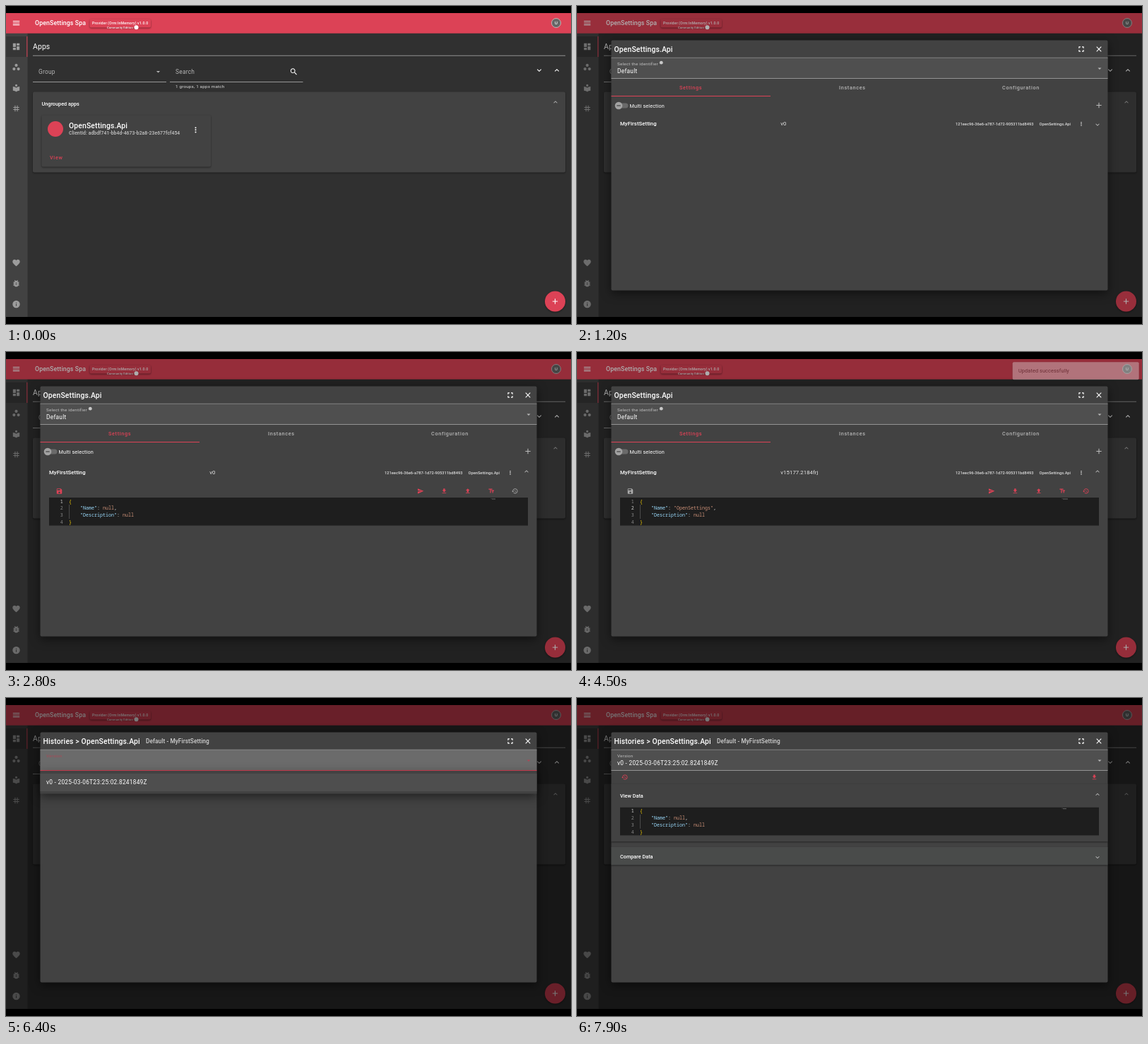
An HTML page that plays this animation: 800x450 px, repeating every 8000 ms.

```html
<!DOCTYPE html>
<html lang="en">
<head>
<meta charset="utf-8">
<title>Settings console</title>
<style>
  html, body { margin: 0; width: 100%; height: 100%; overflow: hidden; background: #000; }
  svg { display: block; width: 800px; height: 450px; font-family: Roboto, sans-serif; }
  text { white-space: pre; }
  .mono { font-family: "Noto Sans Mono", monospace; }
  .lift { filter: drop-shadow(0 1px 1.2px rgba(0, 0, 0, .45)); }
  .high { filter: drop-shadow(0 4px 7px rgba(0, 0, 0, .5)); }
</style>
</head>
<body>
<svg id="stage" viewBox="0 0 800 450"></svg>
<script>
const LOOP = 8000;
const RED = '#dc4256', GREY = '#9c9c9c', PANEL = '#424242';

const ICONS = {
  menu: 'M3 18h18v-2H3v2zm0-5h18v-2H3v2zm0-7v2h18V6H3z',
  dashboard: 'M3 13h8V3H3v10zm0 8h8v-6H3v6zm10 0h8V11h-8v10zm0-18v6h8V3h-8z',
  groups: 'M6 13a4 4 0 100 8 4 4 0 000-8zm6-10a4 4 0 100 8 4 4 0 000-8zm6 10a4 4 0 100 8 4 4 0 000-8z',
  library: 'M12 11.55C9.64 9.35 6.48 8 3 8v11c3.48 0 6.64 1.35 9 3.55 2.36-2.19 5.52-3.55 9-3.55V8c-3.48 0-6.64 1.35-9 3.55zM12 8a3 3 0 100-6 3 3 0 000 6z',
  tag: 'M20 10V8h-4V4h-2v4h-4V4H8v4H4v2h4v4H4v2h4v4h2v-4h4v4h2v-4h4v-2h-4v-4h4zm-6 4h-4v-4h4v4z',
  heart: 'M12 21.35l-1.45-1.32C5.4 15.36 2 12.28 2 8.5 2 5.42 4.42 3 7.5 3c1.74 0 3.41.81 4.5 2.09C13.09 3.81 14.76 3 16.5 3 19.58 3 22 5.42 22 8.5c0 3.78-3.4 6.86-8.55 11.54L12 21.35z',
  bug: 'M20 8h-2.81c-.45-.78-1.07-1.45-1.82-1.96L17 4.41 15.59 3l-2.17 2.17C12.96 5.06 12.49 5 12 5c-.49 0-.96.06-1.41.17L8.41 3 7 4.41l1.62 1.63C7.88 6.55 7.26 7.22 6.81 8H4v2h2.09c-.05.33-.09.66-.09 1v1H4v2h2v1c0 .34.04.67.09 1H4v2h2.81c1.04 1.79 2.97 3 5.19 3s4.15-1.21 5.19-3H20v-2h-2.09c.05-.33.09-.66.09-1v-1h2v-2h-2v-1c0-.34-.04-.67-.09-1H20V8zm-6 8h-4v-2h4v2zm0-4h-4v-2h4v2z',
  info: 'M12 2a10 10 0 100 20 10 10 0 000-20zm1 15h-2v-6h2v6zm0-8h-2V7h2v2z',
  search: 'M15.5 14h-.79l-.28-.27C15.41 12.59 16 11.11 16 9.5 16 5.91 13.09 3 9.5 3S3 5.91 3 9.5 5.91 16 9.5 16c1.61 0 3.09-.59 4.23-1.57l.27.28v.79l5 4.99L20.49 19l-4.99-5zm-6 0C7.01 14 5 11.99 5 9.5S7.01 5 9.5 5 14 7.01 14 9.5 11.99 14 9.5 14z',
  down: 'M16.59 8.59L12 13.17 7.41 8.59 6 10l6 6 6-6z',
  up: 'M12 8l-6 6 1.41 1.41L12 10.83l4.59 4.58L18 14z',
  caret: 'M7 10l5 5 5-5z',
  more: 'M12 8a2 2 0 100-4 2 2 0 000 4zm0 2a2 2 0 100 4 2 2 0 000-4zm0 6a2 2 0 100 4 2 2 0 000-4z',
  add: 'M19 13h-6v6h-2v-6H5v-2h6V5h2v6h6v2z',
  close: 'M19 6.41L17.59 5 12 10.59 6.41 5 5 6.41 10.59 12 5 17.59 6.41 19 12 13.41 17.59 19 19 17.59 13.41 12z',
  full: 'M7 14H5v5h5v-2H7v-3zm-2-4h2V7h3V5H5v5zm12 7h-3v2h5v-5h-2v3zM14 5v2h3v3h2V5h-5z',
  save: 'M17 3H5c-1.11 0-2 .9-2 2v14c0 1.1.89 2 2 2h14c1.1 0 2-.9 2-2V7l-4-4zm-5 16a3 3 0 110-6 3 3 0 010 6zm3-10H5V5h10v4z',
  send: 'M2.01 21L23 12 2.01 3 2 10l15 2-15 2z',
  download: 'M19 9h-4V3H9v6H5l7 7 7-7zM5 18v2h14v-2H5z',
  upload: 'M9 16h6v-6h4l-7-7-7 7h4zm-4 2h14v2H5z',
  letters: 'M2.5 4v3h5v12h3V7h5V4h-13zm19 5h-9v3h3v7h3v-7h3V9z',
  history: 'M13 3c-4.97 0-9 4.03-9 9H1l3.89 3.89.07.14L9 12H6c0-3.87 3.13-7 7-7s7 3.13 7 7-3.13 7-7 7c-1.93 0-3.68-.79-4.94-2.06l-1.42 1.42C8.27 19.99 10.51 21 13 21c4.97 0 9-4.03 9-9s-4.03-9-9-9zm-1 5v5l4.28 2.54.72-1.21-3.5-2.08V8H12z'
};

const clamp = v => Math.max(0, Math.min(1, v));
const ease = v => 1 - (1 - clamp(v)) ** 3;
const escape = s => s.replace(/&/g, '&amp;').replace(/</g, '&lt;');
const rect = (x, y, w, h, fill, extra = '') =>
  `<rect x="${x}" y="${y}" width="${w}" height="${h}" fill="${fill}" ${extra}/>`;
const circle = (x, y, r, fill, extra = '') =>
  `<circle cx="${x}" cy="${y}" r="${r}" fill="${fill}" ${extra}/>`;
const icon = (name, x, y, size = 12.5, fill = '#fff') =>
  `<path d="${ICONS[name]}" fill="${fill}" transform="translate(${x - size / 2} ${y - size / 2}) scale(${size / 24})"/>`;
// Text is placed by its left edge and the middle of its capitals.
const text = (x, y, size, str, { weight = 400, fill = '#fff', gap = 0, extra = '' } = {}) =>
  `<text x="${x}" y="${y + size * .355}" font-size="${size}" font-weight="${weight}" fill="${fill}" letter-spacing="${gap}" ${extra}>${escape(str)}</text>`;
const bold = (x, y, size, str, fill = '#fff', gap = 0) => text(x, y, size, str, { weight: 500, fill, gap });
const heading = (x, y, str) => bold(x, y, 10.42, str, '#fff', .13);
const field = (x, y, str, fill = '#fff') => text(x, y, 8.33, str, { fill, gap: .26 });
const small = (x, y, str, fill) => text(x, y, 6.25, str, { fill, gap: .2 });

function page(t) {
  const hover = clamp((t - 500) / 300);
  const side = [['dashboard', 57.5], ['groups', 86.5], ['library', 116], ['tag', 145],
    ['heart', 363.5], ['bug', 392.5], ['info', 422]];
  return rect(0, 10, 800, 430, '#303030') +
    rect(0, 38, 30.5, 402, PANEL) + rect(0, 43, 30, 29, '#363636') + rect(29.3, 43, 1, 29, RED) +
    side.map(([name, y]) => icon(name, 14.5, y, 12.5, GREY)).join('') +
    rect(0, 10, 800, 28.7, RED) + icon('menu', 14.5, 24) +
    bold(41, 24.3, 8.8, 'OpenSettings Spa', '#fff', .11) +
    rect(118.5, 18.5, 86.5, 12, RED, 'rx="2" class="lift"') +
    bold(122, 24.3, 5.2, 'Provider (Orm:InMemory) v1.0.0', '#fff', .15) +
    bold(143, 30.1, 4.17, 'Community Edition', '#fff', .09) + circle(184.5, 30.2, 3, '#fff') +
    circle(779, 24, 6.5, '#666', 'stroke="#ccc" stroke-width=".8"') + bold(777, 24.2, 6, 'U') +
    text(38, 57, 10.42, 'Apps', { gap: .13 }) + rect(38, 69.8, 754, .8, '#aaa') +
    field(46, 93.3, 'Group', '#b5b5b5') + icon('caret', 215.5, 93, 12.5, '#b5b5b5') + rect(38, 107, 189, .8, '#b0b0b0') +
    field(240, 93.3, 'Search', '#b5b5b5') + icon('search', 407.5, 93) + rect(232, 107, 188.5, .8, '#b0b0b0') +
    small(240, 114, '1 groups, 1 apps match', '#ddd') +
    icon('down', 755, 91) + icon('up', 780, 91) +
    rect(38, 121.5, 754, 114, PANEL, 'rx="2" class="lift"') +
    bold(50.5, 138.2, 7.29, 'Ungrouped apps') + icon('up', 778, 136, 11, '#b5b5b5') +
    rect(50.5, 154.5, 239.5, 73, PANEL, 'rx="2" class="lift"') +
    circle(70, 174, 11, RED) + heading(89, 169.5, 'OpenSettings.Api') +
    bold(89, 179.3, 6.77, 'ClientId: adbdf741-bb4d-4673-b2a8-23e677fcf454', '#c6c6c6', .09) +
    icon('more', 268.5, 175.3) +
    rect(54.5, 204.5, 33.5, 18.5, RED, `rx="2" opacity="${.25 * hover}"`) +
    bold(62, 214, 7.29, 'View', RED, .65) +
    circle(777.5, 418, 14.5, RED, 'class="lift"') + icon('add', 777.5, 418);
}

const backdrop = opacity => rect(0, 10, 800, 430, '#000', `opacity="${opacity}"`);

const dialogFrame = title =>
  rect(48.5, 48.5, 703, 354, PANEL, 'rx="2" class="high"') + heading(52.5, 61, title) +
  icon('full', 714, 61) + icon('close', 739, 61);

const selectBox = (fill, line, accent) =>
  rect(48.5, 73, 703, 29.5, fill) + rect(48.5, 72.8, 703, .8, '#8d8d8d') +
  rect(48.5, 102, 703, accent ? 1.2 : .8, line) + icon('caret', 740, 88.5, 12, accent || '#b8b8b8');

// "value" is the JSON value of Name, "active" the line that holds the cursor.
function editor(y, value, active) {
  const span = (str, fill) => `<tspan fill="${fill}">${str}</tspan>`;
  const entry = (key, val, end) => span(`    "${key}"`, '#9cdcfe') + span(': ', '#dcdcdc') + span(val, '#ce9178') + span(end, '#dcdcdc');
  const lines = [span('{', '#ffd700'), entry('Name', value, ','), entry('Description', 'null', ''), span('}', '#ffd700')];
  return rect(61, y, 678, 39.6, '#1e1e1e') + rect(89.3, y + 10, .6, 20, '#6a6a6a') +
    lines.map((line, i) => {
      const base = y + 7.5 + i * 9.9;
      return `<text class="mono" font-size="6.68" y="${base}" x="80.8" text-anchor="end" fill="${i + 1 === active ? '#d0d0d0' : '#858585'}">${i + 1}</text>` +
        `<text class="mono" font-size="6.68" y="${base}" x="89">${line}</text>`;
    }).join('') +
    rect(686.5, y + 1, 1, .5, '#888') + rect(688, y + 1.7, value === 'null' ? 5 : 7, .6, '#999');
}

function settingsDialog(t) {
  const open = t >= 2800, edited = t >= 3900, saved = t >= 4500, historyHover = t >= 5500;
  const rowY = open ? 170.5 : 166.5;
  const tab = (x, str, fill) => bold(x, 115.5, 7.29, str, fill, .65);
  let out = dialogFrame('OpenSettings.Api') + selectBox('#4f4f4f', '#a5a5a5') +
    small(57, 81.3, 'Select the identifier', '#c0c0c0') + circle(119.3, 80.2, 2.4, '#c8c8c8') +
    field(57, 92.3, 'Default') +
    tab(145, 'Settings', RED) + tab(371, 'Instances', '#b5b5b5') + tab(602, 'Configuration', '#b5b5b5') +
    rect(48.5, 127, 225.5, 1, RED) +
    rect(56, 137.5, 16.5, 7, '#6a6a6a', 'rx="3.5"') + circle(59, 141, 5.3, '#a2a2a2') + rect(56.3, 140.4, 5.4, 1.2, PANEL) +
    text(74.5, 141, 7.29, 'Multi selection', { gap: .13 }) + icon('add', 739, 140.5, 12.5, '#bbb');
  if (t >= 1900 && !open) out += rect(48.5, 154, 703, 25.2, '#4a4a4a');
  out += bold(61, rowY, 7.81, 'MyFirstSetting', '#fff', .04) +
    text(288.3, rowY, 7.81, saved ? 'v15177.2184frj' : 'v0', { fill: '#e6e6e6', gap: .04 }) +
    bold(536, rowY, 5.73, '121eec96-36e6-a787-1d72-905311bd8493', '#ddd') +
    bold(654.5, rowY, 5.73, 'OpenSettings.Api', '#ddd') + icon('more', 714, rowY + .3, 8.5) +
    icon(open ? 'up' : 'down', 737, open ? 169 : 168, 11, '#bbb');
  if (!open) return out;
  if (edited && !saved) out += rect(61, 187.5, 29, 18.5, RED, 'opacity=".22"');
  if (historyHover) out += rect(706, 187.5, 33, 18.5, RED, 'opacity=".25"');
  out += icon('save', 75.5, 197, 10, saved ? '#aaa' : RED);
  ['send', 'download', 'upload', 'letters'].forEach((name, i) => out += icon(name, 587 + i * 33.4, 196.8, 9.6, RED));
  return out + icon('history', 720.5, 196.8, 9.6, saved ? RED : '#aaa') +
    editor(206, edited ? '"OpenSettings"' : 'null', edited ? 2 : 1);
}

function toast(t) {
  if (t < 4500 || t >= 5500) return '';
  return `<g opacity="${clamp((t - 4440) / 150)}">` +
    rect(616.7, 14.2, 179, 25, '#d9d9d9', 'rx="2" class="lift"') +
    text(625, 26.7, 7.29, 'Updated successfully', { fill: '#2b2b2b', gap: .13 }) + '</g>';
}

function historyDialog(t) {
  const stamp = 'v0 - 2025-03-06T23:25:02.8241849Z';
  const chosen = t >= 6900;
  const fade = 1 - clamp((t - 6900) / 150);
  let out = dialogFrame('Histories > OpenSettings.Api') +
    bold(198, 61, 8.33, 'Default - MyFirstSetting', '#d0d0d0', .06) +
    (chosen ? selectBox('#4f4f4f', '#a5a5a5') : selectBox('#6b6b6b', RED, '#a84a57')) +
    small(57, 81.3, 'Version', chosen ? '#c0c0c0' : t < 6500 ? '#a84a57' : RED);
  if (chosen) {
    const grow = ease((t - 6850) / 225);
    const bottom = 146.5 + 56.5 * grow;
    out += field(57, 92.3, stamp) + icon('history', 67.5, 112, 9.6, RED) + icon('download', 732.5, 112, 9.6, RED) +
      rect(48.5, 121.5, 703, bottom - 121.5, PANEL, 'class="lift"') +
      bold(61, 134.5 + 4 * grow, 7.29, 'View Data') + icon('up', 737, 136.5, 11, '#bbb') +
      `<clipPath id="body"><rect x="48" y="121" width="704" height="${bottom - 121}"/></clipPath>` +
      `<g clip-path="url(#body)">${editor(154.8, 'null', 1)}</g>` +
      rect(48.5, bottom + 8, 703, 25.2, t >= 7700 ? '#494b4a' : PANEL, 'class="lift"') +
      bold(61, bottom + 21, 7.29, 'Compare Data') + icon('down', 737, bottom + 22.5, 11, '#bbb');
  }
  if (fade > 0) {
    out += `<g opacity="${fade}">` + rect(48.5, 103.2, 703, 32.3, PANEL, 'class="high"') +
      rect(48.5, 107, 703, 25, '#4e4e4e') + field(57, 119.5, stamp) + '</g>';
  }
  return out;
}

function picture(t) {
  let out = page(t);
  if (t >= 1200) out += backdrop(t < 1300 ? .31 : .32) + (t < 6400 ? settingsDialog(t) : '') + toast(t);
  if (t >= 6400) out += backdrop(t < 6500 ? .3 : .32) + historyDialog(t);
  return out + rect(0, 0, 800, 10, '#000') + rect(0, 440, 800, 10, '#000');
}

const stage = document.getElementById('stage');
let shown = '';
function tick() {
  const next = picture(performance.now() % LOOP);
  if (next !== shown) stage.innerHTML = shown = next;
  requestAnimationFrame(tick);
}
tick();
</script>
</body>
</html>
```
